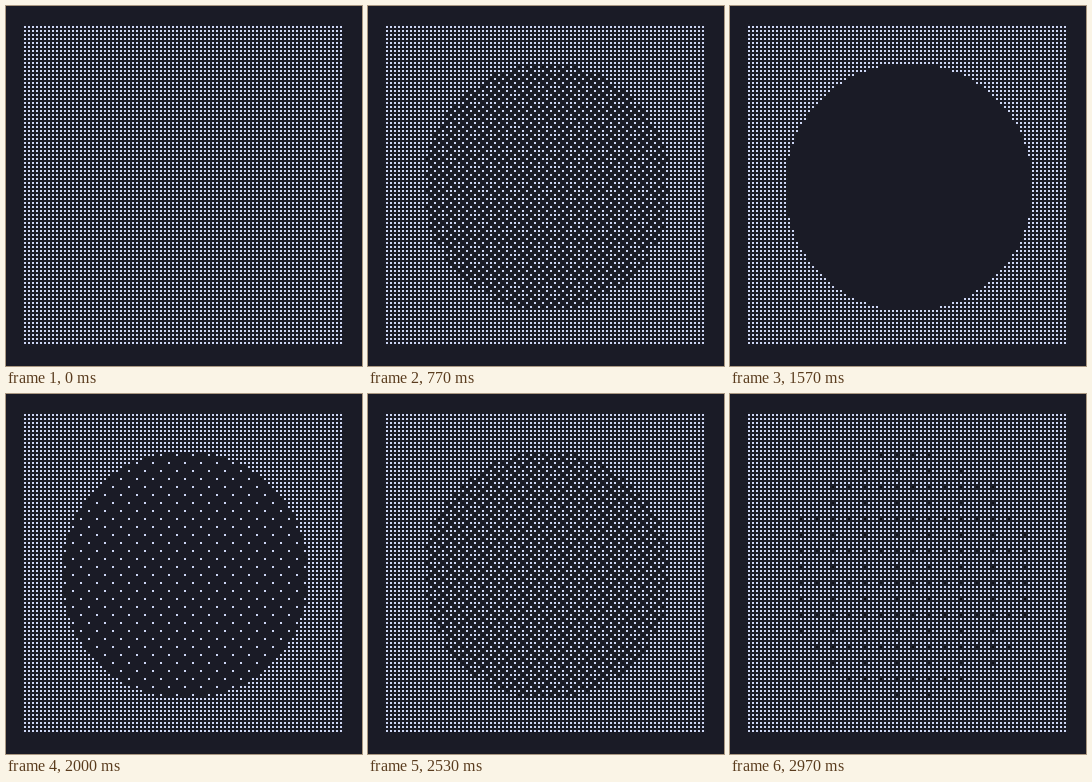
An HTML page with a canvas that plays this animation: 356x360 px, repeating every 3 s.

```html
<!DOCTYPE html>
<html lang="en">
<head>
<meta charset="utf-8">
<title>Dithered circle</title>
<style>
html, body { margin: 0; width: 100%; height: 100%; overflow: hidden; background: #1a1b26; }
canvas { display: block; }
</style>
</head>
<body>
<canvas id="stage" width="356" height="360"></canvas>
<script>
const ctx = document.getElementById('stage').getContext('2d');
const GRID = 80, PITCH = 4, DOT = 2, CENTER = 40, RADIUS = 31;
const LOOP = 3000, FRAMES = 90, PERIOD = 3122, PEAK = 68.6;

// Ordered-dither rank (0 to 63) of a cell in the 8 by 8 Bayer matrix
function rank(x, y) {
  let value = 0;
  for (let bit = 0; bit < 3; bit++) {
    const a = x >> bit & 1, b = y >> bit & 1;
    value = value * 4 + ((a ^ b) * 2 + a);
  }
  return value;
}

const inCircle = (x, y) => (x - CENTER) ** 2 + (y - CENTER) ** 2 < RADIUS ** 2;

function draw(time) {
  const frame = Math.min(FRAMES - 1, Math.floor((time % LOOP + 5) * FRAMES / LOOP));
  const phase = (frame * LOOP / FRAMES - PEAK) / PERIOD * 2 * Math.PI;
  const level = 32 + 32.1 * Math.cos(phase);

  ctx.fillStyle = '#1a1b26';
  ctx.fillRect(0, 0, 356, 360);
  ctx.fillStyle = '#cdd6f4';
  for (let y = 0; y < GRID; y++) {
    for (let x = 0; x < GRID; x++) {
      if (inCircle(x, y) && rank(x + 2, y + 2) + 0.5 >= level) continue;
      ctx.fillRect(18 + x * PITCH, 20 + y * PITCH, DOT, DOT);
    }
  }
}

let start;
function tick(now) {
  start ??= now;
  draw(now - start);
  requestAnimationFrame(tick);
}
draw(0);
requestAnimationFrame(tick);
</script>
</body>
</html>
```
